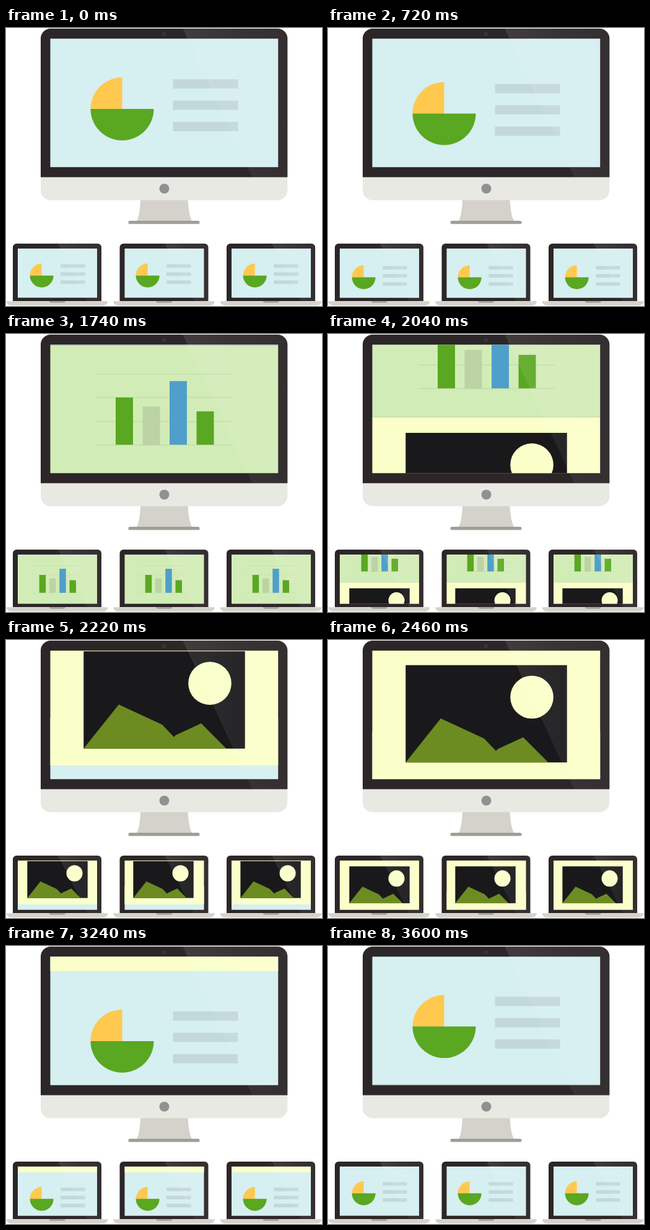
Write an HTML page that moves like this. It is 510 px wide and 450 px high and loops after 3.63 s.

```html
<!DOCTYPE html>
<html lang="en">
<head>
<meta charset="utf-8">
<title>Slides on four screens</title>
<style>
  html, body { margin: 0; height: 100%; overflow: hidden; background: #fff; }
  svg { display: block; width: 100vw; height: 100vh; }
  .bezel { fill: #2c2628; }
  .blue-bg { fill: #d6eff1; }
  .green-bg { fill: #d2ecb7; }
  .cream { fill: #faffca; }
  .green { fill: #5aa721; }
  .metal { fill: #d4d2ca; }
  .foot { fill: #9f9f98; }
  .text-line { fill: #c3d8db; }
  .grid { fill: none; stroke: #bbd5a5; }
</style>
</head>
<body>
<svg viewBox="0 0 510 450">
  <defs>
    <linearGradient id="shine">
      <stop offset="0" stop-color="#fff" stop-opacity=".1"/>
      <stop offset=".5" stop-color="#fff" stop-opacity=".06"/>
      <stop offset="1" stop-color="#fff" stop-opacity=".04"/>
    </linearGradient>
    <clipPath id="monitorScreen"><rect x="71.5" y="17.2" width="367.7" height="208"/></clipPath>
    <clipPath id="laptopScreen"><rect x="19" y="357" width="128" height="79.7"/></clipPath>

    <g id="pieSlide">
      <rect class="blue-bg" x="60" y="-60" width="400" height="285.5"/>
      <path fill="#ffc94f" d="M187.5 131V80A51 51 0 0 0 136.5 131Z"/>
      <path class="green" d="M136.5 131A51 51 0 0 0 238.5 131Z"/>
      <path class="text-line" d="M269.5 83h105v15h-105zM269.5 117.5h105v15h-105zM269.5 152h105v15h-105z"/>
    </g>

    <!-- All slides in one column; the loop ends on a second copy of the first. -->
    <g id="slides"><g id="column">
      <use href="#pieSlide" y="626"/>
      <use href="#pieSlide"/>
      <rect class="green-bg" x="60" y="225.5" width="400" height="208"/>
      <g transform="translate(0 226.5)">
        <path class="grid" d="M145.5 45.5h220M145.5 83.5h220M145.5 122.5h220"/>
        <path class="green" d="M177 83.5h28v77h-28zM307.5 106h28v54.5h-28z"/>
        <path fill="#bcd4a4" d="M220.5 98h28v62.5h-28z"/>
        <path fill="#4f9fca" d="M264 57h28v103.5h-28z"/>
        <path class="grid" d="M145.5 160.5h220"/>
      </g>
      <rect class="cream" x="60" y="433.5" width="400" height="210"/>
      <g transform="translate(0 418)">
        <rect fill="#19191b" x="125.3" y="40.7" width="260.4" height="157.5"/>
        <circle class="cream" cx="329" cy="92.5" r="34.8"/>
        <path fill="#6c8c22" d="M125.3 198.2L182 127L252 159.5L271 179.5L274 176.5L315 157.5L355.5 198.2Z"/>
      </g>
      <rect class="green-bg" x="60" y="851.5" width="400" height="80"/>
    </g></g>

    <g id="lid">
      <path class="bezel" d="M11 442V355a6 6 0 0 1 6-6h131a6 6 0 0 1 6 6v87z"/>
      <circle cx="83" cy="353" r="1" fill="#403a3c"/>
    </g>
    <g id="laptopFront">
      <path fill="url(#shine)" d="M84 349h64a6 6 0 0 1 6 6v87h-23z"/>
      <path class="metal" d="M1 442.3h163v2.2q-2 4.5-8 4.5H9q-6 0-8-4.5z"/>
      <path class="foot" d="M69.5 442.3h26.5q-.5 2.4-3 2.4H72.500q-2.500 0-3-2.400z"/>
    </g>
  </defs>

  <path class="metal" d="M217 278h76.500Q295 304 300.500 313H210.500Q216 304 217 278Z"/>
  <rect class="foot" x="197.500" y="312" width="115" height="5.300" rx="2.600"/>
  <rect fill="#e9e9e4" x="56" y="1" width="398.300" height="277.700" rx="16"/>
  <path class="bezel" d="M56 241.500V17a16 16 0 0 1 16-16h366.300a16 16 0 0 1 16 16v224.500z"/>
  <circle cx="255" cy="10" r="2.300" fill="#2c2628" stroke="#504a4c"/>
  <g clip-path="url(#monitorScreen)"><use href="#slides"/></g>
  <path fill="url(#shine)" d="M285.500 1H438.300a16 16 0 0 1 16 16V241.500H397.500z"/>
  <circle cx="255.500" cy="260" r="8" fill="#919191"/>

  <g id="laptops"></g>
</svg>
<script>
  const LOOP = 3630, STEP = 30;
  const moves = [
    { start: 480, from: 0, to: 208, length: 780 },
    { start: 1710, from: 208, to: 418, length: 750 },
    { start: 2850, from: 418, to: 626, length: 780 }
  ];
  const WINDUP = 14, OVERSHOOT = 23.5;

  // Bezier easing with zero slope at both ends.
  function ease(x, x1, x2) {
    let low = 0, high = 1, u = 0.5;
    for (let i = 0; i < 24; i++) {
      u = (low + high) / 2;
      const v = 1 - u;
      if (3 * v * v * u * x1 + 3 * v * u * u * x2 + u * u * u < x) low = u;
      else high = u;
    }
    return u * u * (3 - 2 * u);
  }

  const blend = (a, b, p) => a + (b - a) * p;

  function moveAt({ from, to, length }, t) {
    const back = from - WINDUP, past = to + OVERSHOOT;
    if (t < 190) return blend(from, back, ease(t / 190, 0.42, 0.58));
    if (t < 540) return blend(back, past, ease((t - 190) / 350, 0.57, 0.23));
    if (t < length) return blend(past, to, ease((t - 540) / (length - 540), 0.42, 0.58));
    return to;
  }

  function scrollAt(time) {
    const move = moves.filter(m => m.start <= time).pop();
    return move ? moveAt(move, time - move.start) : 0;
  }

  const laptop = (x, slidesX) => `
    <g transform="translate(${x} 0)">
      <use href="#lid"/>
      <g clip-path="url(#laptopScreen)">
        <use href="#slides" transform="translate(${slidesX - x - 12.5} 351) scale(.374 .379)"/>
      </g>
      <use href="#laptopFront"/>
    </g>`;
  document.getElementById('laptops').innerHTML =
    laptop(0, 0) + laptop(172.5, 171) + laptop(345, 344);

  const column = document.getElementById('column');
  const origin = performance.now();

  function draw() {
    const time = (performance.now() - origin) % LOOP;
    const stepped = Math.floor((time + 1) / STEP) * STEP;
    column.setAttribute('transform', `translate(0 ${-scrollAt(stepped)})`);
    requestAnimationFrame(draw);
  }
  draw();
</script>
</body>
</html>
```
